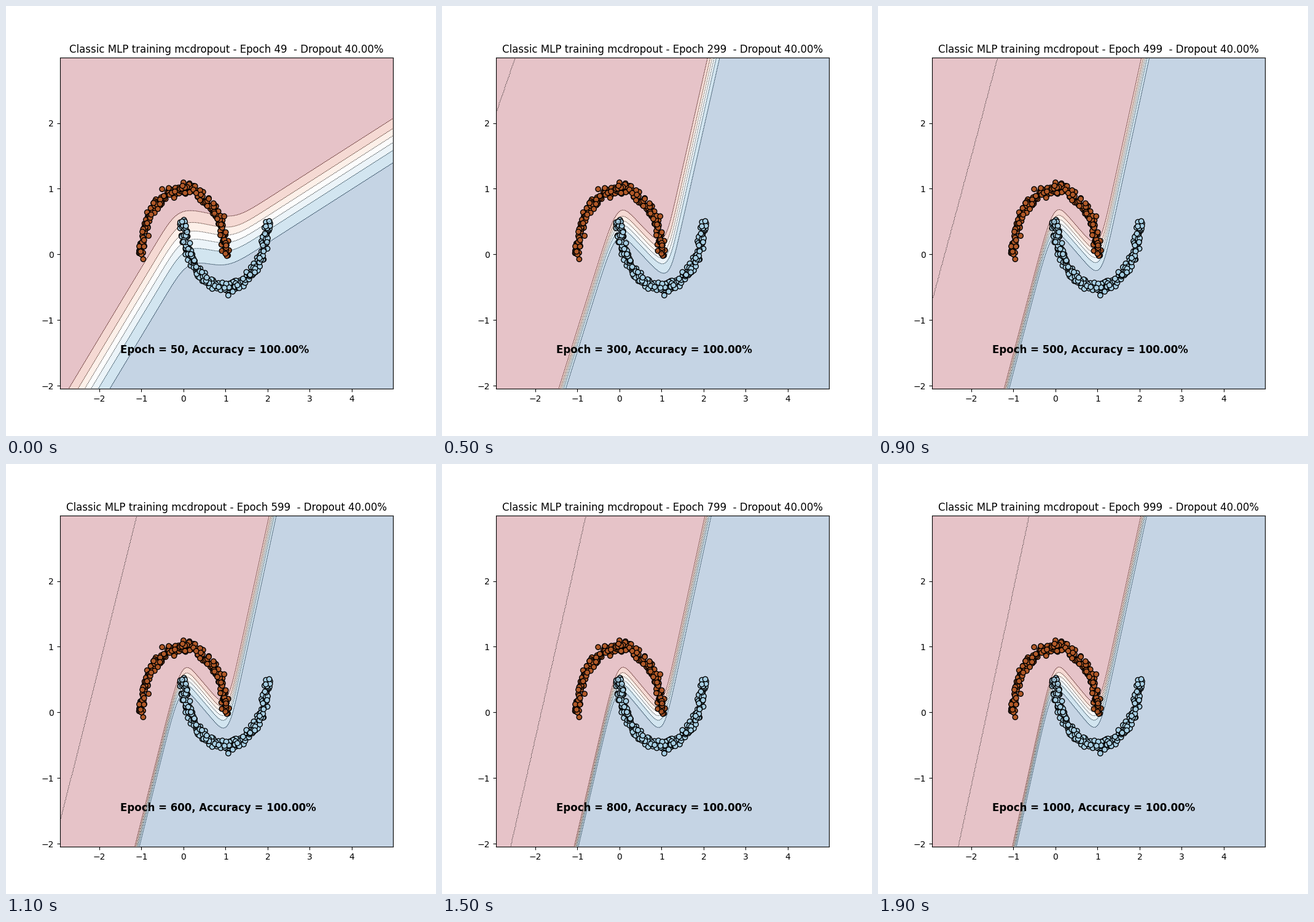
A matplotlib script for the animation above (2 s loop, 700 px wide and 700 px high).

```python
import numpy as np
import matplotlib.pyplot as plt
from matplotlib.animation import FuncAnimation

# Layout in stage pixels: origin of the data and pixels per unit
X0, Y0, SX, SY = 288.9, 404.3, 68.5, 106.88
LEFT, RIGHT, TOP, BOTTOM = 87.5, 630, 84, 623
FRAMES, STEP, PAD = 20, 2, 30

# Contours sit at logits of the class probability
PROBS = np.arange(.15, .95, .15)
LOGITS = np.log(PROBS / (1 - PROBS))
BANDS = [plt.cm.RdBu((i + .5) / 7) for i in range(7)]

gx = LEFT + STEP * np.arange(-PAD, 273 + PAD)
gy = TOP + STEP * np.arange(-PAD, 271 + PAD)
PX, PY = np.meshgrid(gx, gy)


def to_data(px, py):
    return (np.asarray(px) - X0) / SX, (Y0 - np.asarray(py)) / SY


DX, DY = to_data(gx[PAD:-PAD], gy[PAD:-PAD])


def line(t, a, va, b, vb):
    """Straight line through (a, va) and (b, vb)."""
    return va + (t - a) * (vb - va) / (b - a)


def ramp(offset, width):
    """Logit rising from the first to the last contour over `width` pixels."""
    return LOGITS[0] + offset / width * (LOGITS[-1] - LOGITS[0])


def smooth(field, sigma):
    k = np.exp(-.5 * (np.arange(-PAD, PAD + 1) * STEP / sigma) ** 2)
    k /= k.sum()
    for axis in (0, 1):
        field = np.apply_along_axis(np.convolve, axis, field, k, "valid")
    return field


def logit_field(d):
    """Three planes meet in an N-shaped boundary; d falls from 1 as training settles."""
    left = ramp(PX - line(PY, 623, 234 - 132 * d, 400, 272 - 36 * d),
                6 + 61 * d ** 2.2)
    mid = ramp(PY - line(PX, 300, 331, 350, 394 - 52 * d ** 1.5),
               39 + 43 * d ** 1.5)
    right = ramp(PX - line(PY, 84, 428 + 357 * d ** 4, 300, 381 + 66 * d ** 3),
                 8 + 105 * d ** 2)
    return smooth(np.minimum(left, np.maximum(mid, right)), 8 + 10 * d)


def saturation_line(d):
    """Jagged edge beyond which the output is numerically constant."""
    y = np.arange(TOP, BOTTOM + STEP, STEP)
    s = d ** 1.5
    x = np.interp(y, [84, 230, 623], [279 - 830 * s, 253 - 957 * s, 183 - 1320 * s])
    return to_data(np.round(x / 1.5) * 1.5, y)


def moons(n=250, noise=.042):
    rng = np.random.RandomState(0)
    t = np.linspace(0, np.pi, n)
    upper = np.column_stack([np.cos(t), np.sin(t)])
    lower = np.column_stack([1 - np.cos(t), .5 - np.sin(t)])
    order = rng.permutation(2 * n)
    points = np.vstack([upper, lower])[order]
    colors = np.repeat(["#b15928", "#a6cee3"], n)[order]
    return points + rng.normal(0, noise, points.shape), colors


fig, ax = plt.subplots(figsize=(7, 7), dpi=100)
xlim, ylim = to_data([LEFT, RIGHT], [BOTTOM, TOP])
ax.set(xlim=xlim, ylim=ylim)
ax.autoscale(False)

points, colors = moons()
ax.scatter(*points.T, c=colors, edgecolors="k")
flat_line, = ax.plot([], [], "k:", lw=.7)
label = ax.text(-1.5, -1.5, "", fontsize=12, fontweight="bold", zorder=4)
contours = []


def draw(i):
    epoch = 50 * (i + 1)
    d = 125 / (epoch + 75)
    while contours:
        contours.pop().remove()
    z = logit_field(d)
    contours.append(ax.contourf(DX, DY, z, levels=[-1e4, *LOGITS, 1e4],
                                colors=BANDS, alpha=.25, zorder=0))
    contours.append(ax.contour(DX, DY, z, levels=LOGITS, colors="k",
                               linestyles=":", linewidths=.7))
    flat_line.set_data(*saturation_line(d))
    ax.set_title(f"Classic MLP training mcdropout - Epoch {epoch - 1}  - Dropout 40.00%")
    label.set_text(f"Epoch = {epoch}, Accuracy = 100.00%")


anim = FuncAnimation(fig, draw, frames=FRAMES, init_func=lambda: draw(0),
                     interval=100, repeat=True, repeat_delay=0)
plt.show()
```
